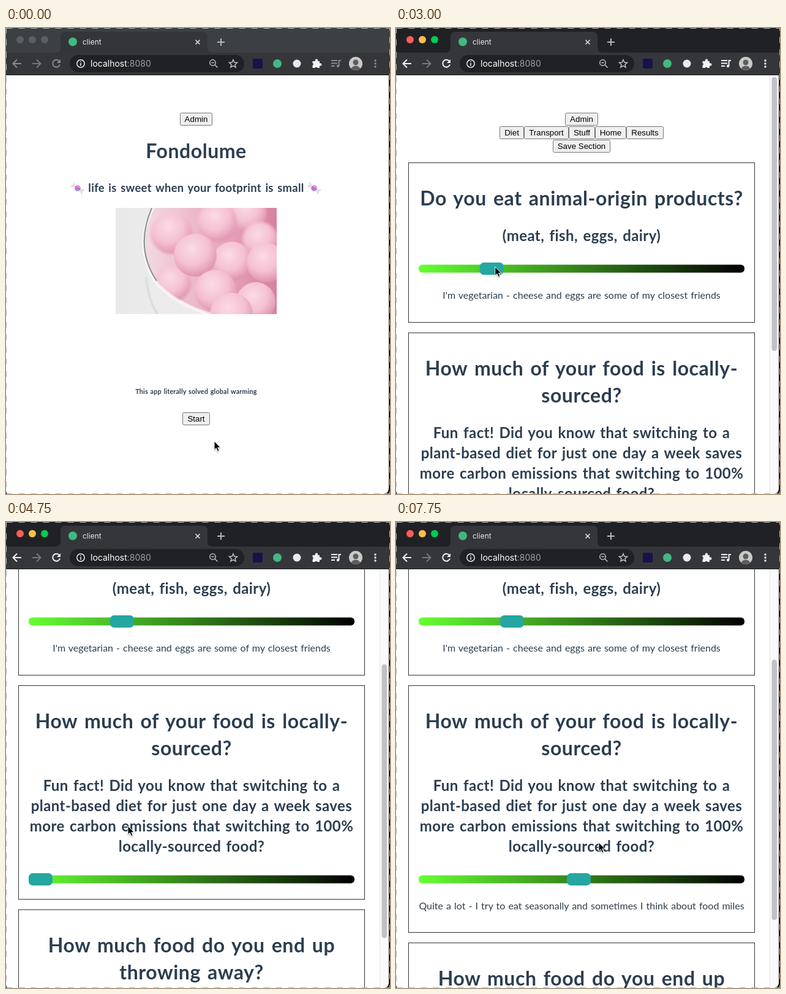
Animation of 627x759 px, one loop 8000 ms. Source, as an HTML page:

```html
<!DOCTYPE html>
<html lang="en">
<head>
<meta charset="utf-8">
<title>client</title>
<style>
html, body { margin: 0; width: 100%; height: 100%; overflow: hidden; background: #161616; }
svg { display: block; width: 627px; height: 759px; }
.av { font-family: Lato, sans-serif; fill: #2c3e50; text-anchor: middle; word-spacing: .06em; }
.b { font-weight: 700; letter-spacing: .017em; word-spacing: .09em; }
.btn { font: 13.33px "Liberation Sans", Arial, sans-serif; text-anchor: middle; }
.ui { font-family: Inter, sans-serif; }
.line { fill: none; stroke-width: 2; }
</style>
</head>
<body>
<svg id="stage" viewBox="0 0 627 759" xmlns="http://www.w3.org/2000/svg"></svg>
<script>
const LOOP = 8000, STEP = 250;

const text = (s, x, y, size, cls = 'av b') =>
  `<text class="${cls}" x="${x}" y="${y}" font-size="${size}">${s}</text>`;

const button = (s, x, y, w, id = '') =>
  `<rect ${id && `id="${id}"`} x="${x + .5}" y="${y + .5}" width="${w - 1}" height="20" rx="2" fill="#efefef" stroke="#767676"/>
   <text class="btn" x="${x + w / 2}" y="${y + 15}">${s}</text>`;

const circle = (x, y, r, fill, more = '') =>
  `<circle cx="${x}" cy="${y}" r="${r}" fill="${fill}" ${more}/>`;

const candy = (x, y) => `<g transform="translate(${x} ${y}) rotate(35)">
  <path d="M-3 0L-11-4L-9 0L-11 4ZM3 0L11-4L9 0L11 4Z" fill="#e6e2e6" stroke="#cfc8cf" stroke-width=".6"/>
  ${circle(0, 0, 4.8, 'url(#sweet)')}
  <path d="M-3-2.5Q0-1 2.5-3.6" fill="none" stroke="#fff" stroke-opacity=".6"/></g>`;

const slider = (id, y) => `
  <rect x="37" y="${y + 3.5}" width="532" height="13" rx="6" fill="url(#track)"/>
  <rect id="${id}" x="37" y="${y}" width="39" height="20" rx="6.5" fill="#25a6a0"/>`;

// Question card; its children are placed relative to the card's top edge.
const card = (n, heads, subs, sliderY) => `<g id="card${n}">
  <rect id="box${n}" x="20.5" y=".5" width="565" height="300" fill="#fff" stroke="#333"/>
  ${heads.map((s, i) => text(s, 303, 70 + 44 * i, 32)).join('')}
  ${subs.map((s, i) => text(s, 303, 84 + 44 * heads.length + 33 * i, 24)).join('')}
  ${sliderY ? slider('thumb' + n, sliderY) + `<text id="answer${n}" class="av" x="303" y="${sliderY + 58.5}" font-size="16"></text>` : ''}
</g>`;

const balls = list => list.map(([x, y, r]) => circle(x, y, r, 'url(#pink)')).join('');
const backBalls = [[395, 302, 30], [345, 316, 32], [270, 334, 34], [415, 345, 29], [272, 416, 30]];
const frontBalls = [[369, 380, 32], [425, 382, 32], [309, 370, 35], [408, 446, 32], [342, 428, 34], [368, 466, 35]];

const photo = `<g clip-path="url(#photoClip)">
  <rect x="179" y="293" width="263" height="173" fill="url(#photoBg)"/>
  <g clip-path="url(#bowl)">
    <rect x="220" y="293" width="222" height="173" fill="url(#depth)"/>
    <g filter="url(#blur)">${balls(backBalls)}</g>${balls(frontBalls)}
  </g>
  <path d="M240 293C214 345 224 385 248 418Q280 450 335 467" fill="none" stroke="#fff" stroke-opacity=".65" stroke-width="5"/>
  <path d="M238 293C220 335 221 375 246 412" fill="none" stroke="#8b9693" stroke-width="2.2"/>
  <path d="M229 405Q231 440 247 466" fill="none" stroke="#d9e0df" stroke-width="4"/></g>`;

const home = `<g id="home">
  ${button('Admin', 284, 138, 53)}
  ${text('Fondolume', 310.5, 212, 32)}
  ${candy(117, 261)}${candy(503, 261)}
  ${text('life is sweet when your footprint is small', 310.5, 267, 18.4)}
  ${photo}
  ${text('This app literally solved global warming', 310.5, 596, 10.72)}
  ${button('Start', 288, 626, 45, 'start')}
</g>`;

const quiz = `<g id="quiz"><g id="scroll">
  ${button('Admin', 276, 138, 54)}
  ${[['Diet', 169, 40], ['Transport', 209, 73], ['Stuff', 282, 43], ['Home', 325, 51], ['Results', 376, 61]]
    .map(([s, x, w]) => button(s, x, 160, w)).join('')}
  ${button('Save Section', 256, 182, 94)}
  ${card(1, ['Do you eat animal-origin products?'], ['(meat, fish, eggs, dairy)'], 163)}
  ${card(2, ['How much of your food is locally-', 'sourced?'], ['Fun fact! Did you know that switching to a',
    'plant-based diet for just one day a week saves', 'more carbon emissions that switching to 100%',
    'locally-sourced food?'], 306)}
  ${card(3, ['How much food do you end up', 'throwing away?'], [], 0)}
  </g>
  <rect x="610" y="77" width="15" height="682" fill="#fafafa"/>
  <path d="M610.5 77V759" stroke="#e6e6e6"/>
  <rect id="bar" x="613.5" width="8.5" rx="4.25" fill="#c1c1c1"/>
</g>`;

const chrome = `
  <rect id="title" width="627" height="40"/>
  <path id="tab" d="M81 40Q89 40 89 32V14Q89 6 97 6H321Q329 6 329 14V32Q329 40 337 40Z"/>
  <rect y="40" width="627" height="37" fill="#35363a"/>
  <path d="M0 76.5H627" stroke="#1d1e20"/>
  ${[23, 43, 63].map((x, i) => circle(x, 19, 6, '#5c5e61', `id="light${i}"`)).join('')}
  ${circle(109, 22.5, 7, '#41b883')}
  <text class="ui" x="125" y="27" font-size="12" fill="#e8eaed">client</text>
  <path d="M309.5 19.5L316.5 26.5M316.5 19.5L309.5 26.5" class="line" stroke="#dfe1e5" style="stroke-width:1.6"/>
  <path d="M345 23H357M351 17V29" class="line" stroke="#b4b7bb"/>
  <path class="line" stroke="#74777b" d="M43 58H56M50 51.5L56.5 58L50 64.5"/>
  <g id="nav">
    <path class="line" d="M25 58H12M18 51.5L11.5 58L18 64.5"/>
    <path class="line" d="M87 54A6 6 0 1 0 88 59.5"/><path d="M89 51V57H83Z" fill="currentColor" stroke="none"/>
    <path class="line" d="M531 53H541M531 57.5H541M531 62H537M543.5 62V53H547"/>
    <g stroke="none">${circle(542, 62, 2.2, 'currentColor')}
    ${[53, 58, 63].map(y => circle(603, y, 1.7, 'currentColor')).join('')}</g>
  </g>
  <rect x="104" y="44" width="285" height="28" rx="14" fill="#202124"/>
  <circle cx="122" cy="58" r="6.2" class="line" stroke="#e8eaed" style="stroke-width:1.5"/>
  <path d="M122 57V61.5M122 54V55.6" class="line" stroke="#e8eaed" style="stroke-width:1.6"/>
  <text class="ui" x="138" y="63" font-size="14" fill="#fff">localhost<tspan fill="#9aa0a6">:8080</tspan></text>
  <g class="line" stroke="#bdc1c6" style="stroke-width:1.5">
    <circle cx="337.5" cy="56.5" r="4.7"/><path d="M341 60L345.5 64.5M335.3 56.5H339.7"/>
    <path d="M371 51.7L372.9 56L377.6 56.4L374 59.5L375.1 64L371 61.6L366.9 64L368 59.5L364.4 56.4L369.1 56Z"/>
  </g>
  <rect x="403" y="50" width="16" height="16" rx="2" fill="#16134a"/>
  ${circle(443, 58, 7, '#41b883')}${circle(475, 58, 6.5, '#e8eaed')}
  <path d="M501 54H505A2.3 2.3 0 1 1 509 54H512V57.5A2.3 2.3 0 1 1 512 61.5V65H508.5A2.2 2.2 0 0 0 504.5 65H500.5V61A2.2 2.2 0 0 0 500.5 57V54Z" fill="#f1f3f4"/>
  <g clip-path="url(#face)"><rect x="560" y="47" width="22" height="22" fill="#c9c9c9"/>
    ${circle(571, 56, 4.5, '#5d5d5d')}<ellipse cx="571" cy="69" rx="8" ry="7.5" fill="#5d5d5d"/></g>`;

const stage = document.getElementById('stage');
stage.innerHTML = `<defs>
  <linearGradient id="track"><stop stop-color="#6f3"/><stop offset="1" stop-color="#000"/></linearGradient>
  <linearGradient id="photoBg"><stop stop-color="#e9e9ea"/><stop offset="1" stop-color="#f6eef1"/></linearGradient>
  <linearGradient id="depth"><stop stop-color="#f3dde4"/><stop offset=".5" stop-color="#eab0c4"/><stop offset="1" stop-color="#d9809f"/></linearGradient>
  <linearGradient id="sweet" x2="1" y2="1"><stop stop-color="#f06ab8"/><stop offset=".55" stop-color="#c86be0"/><stop offset="1" stop-color="#5cc8c4"/></linearGradient>
  <radialGradient id="pink" cx=".42" cy=".34" r=".7"><stop stop-color="#fbdbe5"/><stop offset=".55" stop-color="#f5c1d2"/><stop offset="1" stop-color="#dc8eab"/></radialGradient>
  <clipPath id="photoClip"><rect x="179" y="293" width="263" height="173"/></clipPath>
  <clipPath id="bowl"><path d="M240 293C214 345 224 385 248 418Q280 450 335 467H442V293Z"/></clipPath>
  <clipPath id="face"><circle cx="571" cy="58" r="11"/></clipPath>
  <clipPath id="win"><path d="M0 0H625V749Q625 759 615 759H6Q0 759 0 753Z"/></clipPath>
  <filter id="blur"><feGaussianBlur stdDeviation="2"/></filter>
  <filter id="soft" x="-50%" y="-50%" width="200%" height="200%"><feDropShadow dx="0" dy="1.2" stdDeviation="1" flood-opacity=".35"/></filter>
  </defs>
  <rect width="627" height="759" fill="#161616"/>
  <g clip-path="url(#win)"><rect width="627" height="759" fill="#fff"/>${home}${quiz}</g>
  ${chrome}
  <path id="cursor" d="M0 0V14.2L3.2 11.2L5.6 16.6L8.1 15.5L5.8 10.3H10.2Z" fill="#000" stroke="#fff" stroke-width="1" filter="url(#soft)"/>
  <rect x=".5" y=".5" width="626" height="758" fill="none" stroke="#b4b4b4" stroke-dasharray="10"/>`;

const el = {};
stage.querySelectorAll('[id]').forEach(e => el[e.id] = e);
const set = (id, attrs) => { for (const k in attrs) el[id].setAttribute(k, attrs[k]); };
const show = (id, on) => set(id, { display: on ? 'inline' : 'none' });
const move = (id, x, y) => set(id, { transform: `translate(${x} ${y})` });

// Pointer stops: time, x, y
const path = [[0, 340, 673], [1250, 306, 636], [1500, 290, 615], [2250, 62, 389], [3250, 195, 389],
  [3750, 232, 481], [4500, 232, 481], [4750, 199, 495], [5500, 51, 573], [6500, 199, 571],
  [7000, 293, 573], [7750, 331, 522]];

function pointer(t) {
  const i = path.findIndex(p => p[0] > t);
  if (i < 0) return path[path.length - 1].slice(1);
  const [a, b] = [path[i - 1], path[i]], k = (t - a[0]) / (b[0] - a[0]);
  return [a[1] + (b[1] - a[1]) * k, a[2] + (b[2] - a[2]) * k];
}

const drag = (t, from, to, grip) => t < from ? 37 : pointer(Math.min(t, to))[0] - grip;

function draw(t) {
  const active = t >= 1000, onQuiz = t >= 1500;
  const open1 = t >= 2500, open2 = t >= 5750;
  set('title', { fill: active ? '#202124' : '#3c4043' });
  set('tab', { fill: active ? '#35363a' : '#343539' });
  ['#ff5c5c', '#ffbd4c', '#00ca56'].forEach((c, i) => set('light' + i, { fill: active ? c : '#5c5e61' }));
  const ink = active ? '#f1f3f4' : '#86898d';
  set('nav', { stroke: ink, color: ink });
  set('start', { fill: t >= 1250 ? '#f7f7f7' : '#efefef' });
  show('home', !onQuiz);
  show('quiz', onQuiz);

  const scroll = t < 4000 ? 0 : t < 4250 ? 4 : t < 4750 ? 150 : 230;
  const h1 = open1 ? 261 : 207, h2 = open2 ? 403 : 349;
  const top2 = 219 + h1 + 16, top3 = top2 + h2 + 16;
  move('scroll', 0, -scroll);
  move('card1', 0, 219);
  move('card2', 0, top2);
  move('card3', 0, top3);
  set('box1', { height: h1 - 1 });
  set('box2', { height: h2 - 1 });
  set('thumb1', { x: drag(t, 2250, 3250, 25) });
  set('thumb2', { x: drag(t, 5500, 7000, 14) });
  el.answer1.textContent = t >= 2750 ? "I'm vegetarian - cheese and eggs are some of my closest friends" : '';
  el.answer2.textContent = !open2 ? '' : t < 6750 ? "A lot! I'm a regular at my local farmers' market"
    : 'Quite a lot - I try to eat seasonally and sometimes I think about food miles';

  const bar = open2 ? 424 : open1 ? 446 : 472;
  set('bar', { y: 80 + scroll * bar / 676, height: bar });
  move('cursor', ...pointer(t));
}

const begin = performance.now();
function tick() {
  const t = (performance.now() - begin) % LOOP;
  draw(Math.floor(t / STEP) * STEP);
  requestAnimationFrame(tick);
}
tick();
</script>
</body>
</html>
```
